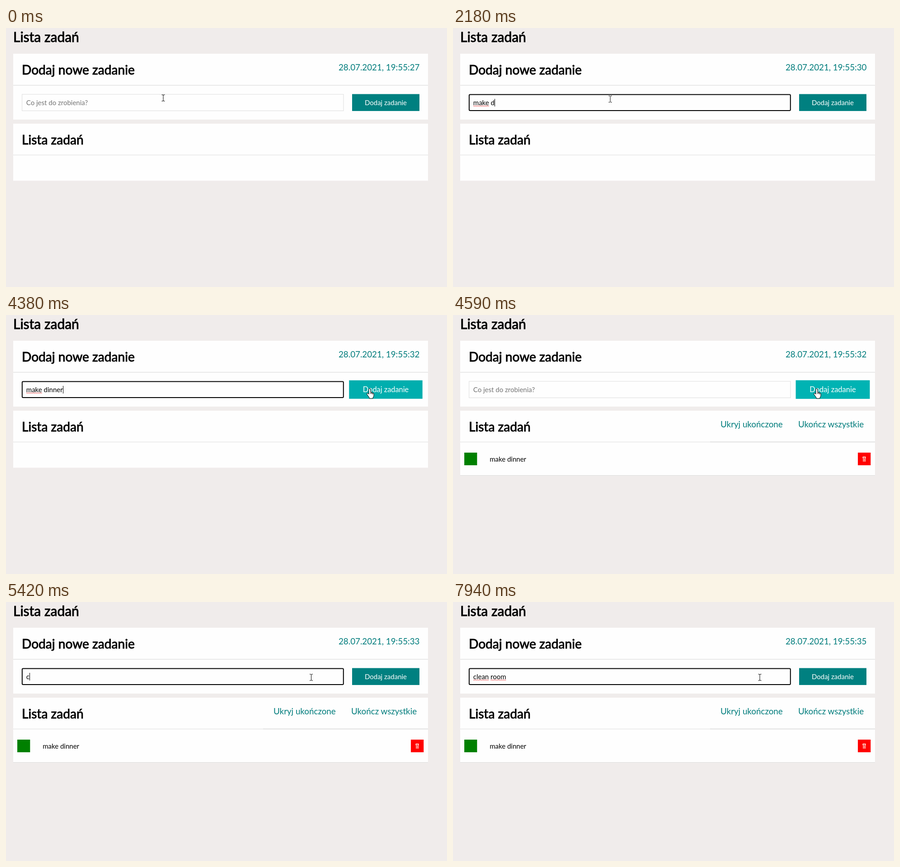
Write an HTML page that moves like this. It is 976 px wide and 574 px high and loops after 8 s.

```html
<!DOCTYPE html>
<html lang="pl">
<head>
<meta charset="utf-8">
<title>Lista zadań</title>
<style>
  html, body { margin: 0; width: 100%; height: 100%; overflow: hidden; background: #f0eceb; }
  svg { display: block; }
  text { font: 15px Lato, sans-serif; white-space: pre; }
  .title { font-size: 28.125px; stroke: #000; stroke-width: .9; }
  .link { font-size: 18.75px; fill: #007c7c; }
  .panel { fill: #fefefe; }
  .rule { fill: #ddd; }
  .pointer path { fill: #fff; stroke: #000; stroke-linejoin: round; }
  .pointer .line { fill: none; }
</style>
</head>
<body>
<svg width="976" height="574" viewBox="0 0 976 574">
  <defs>
    <pattern id="wave" width="4" height="3" patternUnits="userSpaceOnUse" x="45" y="171.5">
      <path d="M-1 3L1 .7 3 2.4 5 .2" fill="none" stroke="#e33" stroke-width=".9"/>
    </pattern>
  </defs>
  <text class="title" x="16" y="31" style="font-size:30px">Lista zadań</text>

  <rect class="panel" x="16" y="57" width="918" height="146"/>
  <rect class="rule" x="16" y="126.4" width="918" height="1.2"/>
  <text class="title" x="35" y="103">Dodaj nowe zadanie</text>
  <text class="link" id="clock" x="915.5" y="94" text-anchor="end"></text>
  <rect id="field" fill="#fefefe"/>
  <text id="hint" x="44.8" y="170.5" fill="#757575">Co jest do zrobienia?</text>
  <text id="entry" x="44.8" y="170.5"></text>
  <rect id="wave1" y="171.5" height="3" fill="url(#wave)"/>
  <rect id="wave2" y="171.5" height="3" fill="url(#wave)"/>
  <rect id="caret" y="157" width="1" height="17"/>
  <g id="button">
    <rect x="-74.5" y="-18.75" width="149" height="37.5"/>
    <text y="5.5" fill="#fff" text-anchor="middle">Dodaj zadanie</text>
  </g>

  <rect class="panel" id="list" x="16" y="212" width="918"/>
  <rect class="rule" x="16" y="281" width="918" height="1"/>
  <text class="title" x="35" y="258">Lista zadań</text>
  <g id="tasks">
    <rect class="rule" x="569" y="280.5" width="365" height="1.8"/>
    <text class="link" x="592" y="249">Ukryj ukończone</text>
    <text class="link" x="764" y="249">Ukończ wszystkie</text>
    <rect x="25" y="305" width="28.3" height="28" fill="green"/>
    <text x="81.2" y="324.5">make dinner</text>
    <rect x="896" y="305" width="28.3" height="28" fill="red"/>
    <path d="M907.5 315.5v-1.5h5v1.5M906 316.2h8M908 316v9M910.3 318v7M912.5 316v9" fill="none" stroke="#ffe9df" stroke-width="1.2"/>
    <rect class="rule" x="16" y="355" width="918" height="1"/>
  </g>

  <g class="pointer" id="beam">
    <path class="line" d="M-3.5-7h2.5l1 1 1-1h2.5M0-6V6M-3.5 7h2.5l1-1 1 1h2.5"/>
  </g>
  <g class="pointer" id="arrow"><path d="M0 0v16l4-4 3 6 2-1-3-6h5z"/></g>
  <g class="pointer" id="hand">
    <path d="M-2 1q0-2 2-2t2 2v6q1-1 2 0v1q2-1 2.5 1q2-.5 2.5 1.5v4q0 3-2 4.5v2h-8v-2l-5-7q-1-2 1-2.5t3 2z"/>
    <path class="line" d="M2 7v4M4.3 8v3M6.6 9v3"/>
  </g>
</svg>
<script>
const LOOP = 8000, BLINK = 530, FADE = 500;
const BLUR = 4450, ADDED = 4520, REFOCUS = 5150;
const $ = id => document.getElementById(id);
const set = (id, attrs) => { for (const k in attrs) $(id).setAttribute(k, attrs[k]); };
const show = (id, on) => set(id, { visibility: on ? 'visible' : 'hidden' });

const type = (words, times) => times.map((time, i) => [time, words.slice(0, i + 1)]);
const edits = [
  [0, ''], [330, ''],
  ...type('make dinner', [1120, 1260, 1530, 1650, 1720, 2180, 2310, 2510, 2640, 2770, 2900]),
  [ADDED, ''], [REFOCUS, ''],
  ...type('clean room', [5420, 5750, 5880, 5960, 6080, 6280, 6500, 6630, 6760, 6960]),
];
const ticks = [200, 1190, 2180, 3160, 4170, 5200, 6220, 7220];

// time, x, y
const route = [
  [0, 348, 155], [70, 348, 155], [200, 348, 157.5], [3619, 348, 157.5], [3620, 405, 154],
  [3830, 610, 157], [4050, 764, 164], [4200, 804, 167], [4310, 805, 164], [4680, 805, 164],
  [4900, 764, 166], [5140, 675.5, 167], [7939, 675.5, 167], [7940, 679, 167], [LOOP, 679, 167],
];

function pointerAt(t) {
  const i = Math.max(1, route.findIndex(p => p[0] > t));
  const [t0, x0, y0] = route[i - 1], [t1, x1, y1] = route[i];
  const k = (t - t0) / (t1 - t0);
  return [x0 + (x1 - x0) * k, y0 + (y1 - y0) * k];
}

function easeFrom(start, t) {
  const k = Math.min(1, Math.max(0, (t - start) / FADE));
  return 1 - (1 - k) ** 2.3;
}

function drawField(t) {
  const focused = t >= 330 && t < BLUR || t >= REFOCUS;
  const [since, value] = edits.findLast(e => e[0] <= t);
  const entry = $('entry'), left = 44.8;
  const widthOf = n => n ? entry.getSubStringLength(0, n) : 0;
  entry.textContent = value;
  show('hint', !value);
  set('field', focused
    ? { x: 35.8, y: 147.5, width: 711, height: 35.5, rx: 2, stroke: '#000', 'stroke-width': 2 }
    : { x: 35.5, y: 147, width: 711.5, height: 36.5, rx: 0, stroke: '#ddd', 'stroke-width': 1 });
  set('caret', { x: Math.round(left + widthOf(value.length)) });
  show('caret', focused && Math.floor((t - since) / BLINK) % 2 === 0);

  const space = value.indexOf(' ');
  show('wave1', focused && space > 0);
  show('wave2', t >= 7940);
  if (space > 0) {
    const start = widthOf(space + 1);
    set('wave1', { x: left, width: widthOf(space) });
    set('wave2', { x: left + start, width: widthOf(value.length) - start });
  }
}

function drawButton(t) {
  const hover = easeFrom(4060, t) - easeFrom(4900, t);
  const tone = 128 + 51 * hover;
  set('button', {
    transform: `translate(840.5 165.2) scale(${1 + .1 * hover})`,
    fill: `rgb(0,${tone},${tone})`,
  });
}

function drawPointer(t) {
  const [x, y] = pointerAt(t);
  const kind = x < 747 ? 'beam' : x < 762 ? 'arrow' : 'hand';
  for (const id of ['beam', 'arrow', 'hand']) show(id, id === kind);
  set(kind, { transform: `translate(${x} ${y})` });
}

function draw(now) {
  const t = now % LOOP;
  const stepped = t >= 3620 && t < 5420 ? 3620 + Math.floor((t - 3620) / 69) * 69 : t;
  $('clock').textContent = '28.07.2021, 19:55:' + (27 + ticks.filter(x => x <= t).length);
  drawField(t);
  drawButton(stepped);
  drawPointer(stepped);
  show('tasks', t >= ADDED);
  set('list', { height: t >= ADDED ? 143 : 126.5 });
  requestAnimationFrame(draw);
}
requestAnimationFrame(draw);
</script>
</body>
</html>
```
